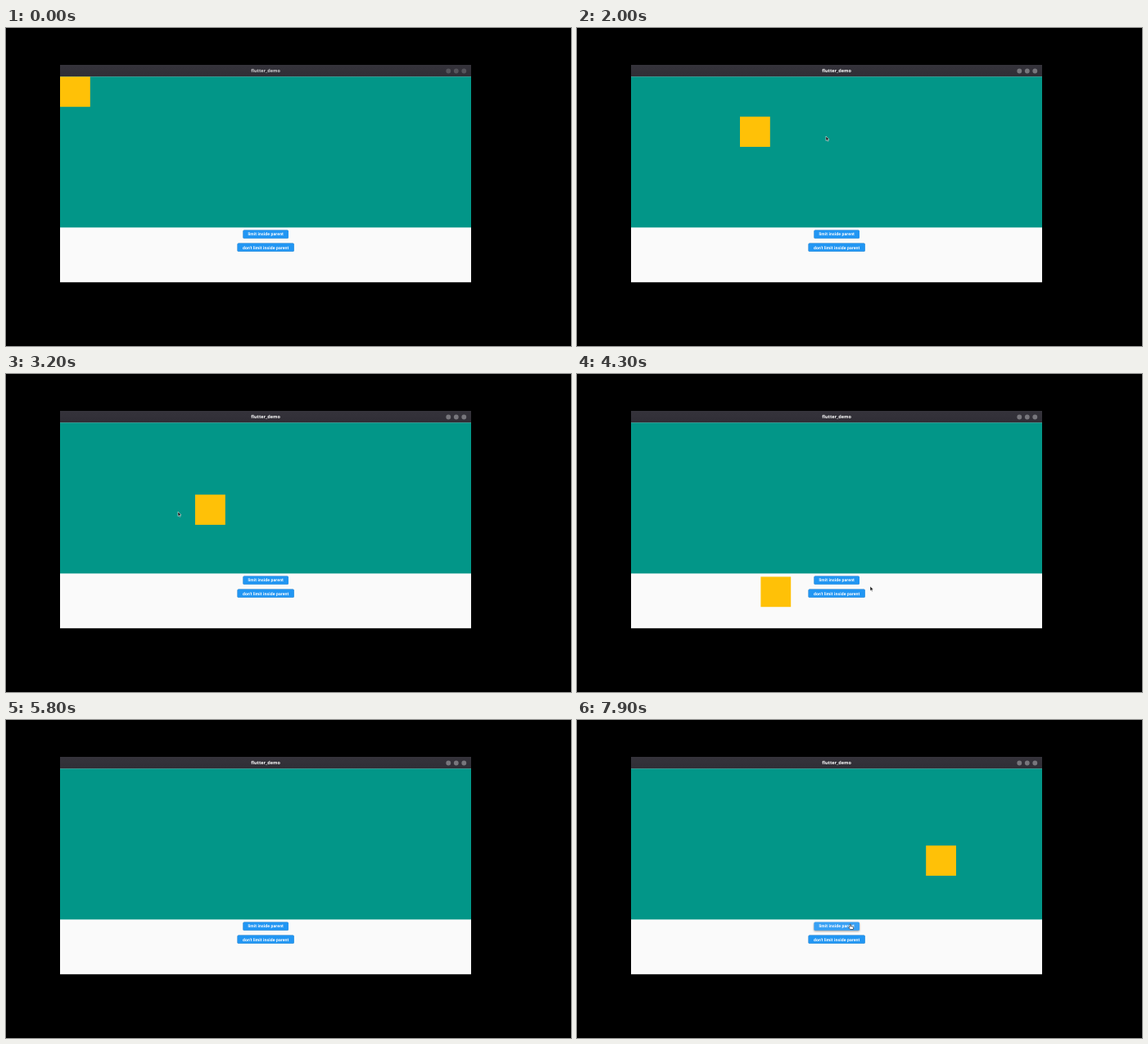
Animation of 690x388 px, one loop 8000 ms. Source, as an HTML page:

```html
<!DOCTYPE html>
<html lang="en">
<head>
<meta charset="utf-8">
<title>flutter_demo</title>
<style>
  html, body { margin: 0; width: 100%; height: 100%; overflow: hidden; background: #000; }
  svg { display: block; width: 690px; height: 388px; }
  text { text-anchor: middle; text-rendering: geometricPrecision; }
  .title { font: bold 5.5px "Open Sans", sans-serif; fill: #fff; }
  .dot { fill: #77767c; }
  .idle .title { fill: #d2d1d4; }
  .idle .dot { fill: #55545b; }
  .button rect { fill: #2196f3; filter: drop-shadow(0 .4px .6px rgba(0, 0, 0, .35)); }
  .button text { font: 700 5.15px Roboto, sans-serif; letter-spacing: .1px; fill: #fff; }
  .hover rect { fill: #37a0f4; filter: drop-shadow(0 1px 1px rgba(0, 0, 0, .38)); }
</style>
</head>
<body>
<svg viewBox="0 0 690 388">
  <defs>
    <clipPath id="frame"><rect x="66" y="45" width="502" height="265.2"/></clipPath>
    <linearGradient id="bar" x2="0" y2="1">
      <stop stop-color="#35333b"/><stop offset="1" stop-color="#302e36"/>
    </linearGradient>
  </defs>
  <rect width="690" height="388"/>
  <g id="window" clip-path="url(#frame)">
    <rect x="66" y="45" width="502" height="266" fill="#fafafa"/>
    <rect x="66" y="45" width="502" height="14.5" fill="url(#bar)"/>
    <text class="title" x="317" y="54.4">flutter_demo</text>
    <circle class="dot" cx="540.3" cy="52.5" r="2.9"/>
    <circle class="dot" cx="549.8" cy="52.5" r="2.9"/>
    <circle class="dot" cx="559.3" cy="52.5" r="2.9"/>
    <rect x="66" y="59.4" width="502" height="184" fill="#029688"/>
    <rect id="box" width="36.8" height="36.8" fill="#ffc107"/>
    <g class="button" id="limit">
      <rect x="289.4" y="246.4" width="55.6" height="10.3" rx="1.5"/>
      <text x="317.2" y="253.4">limit inside parent</text>
    </g>
    <g class="button">
      <rect x="282.5" y="262.5" width="69.3" height="10.3" rx="1.5"/>
      <text x="317.2" y="269.5">don't limit inside parent</text>
    </g>
    <g id="cursor" stroke-linejoin="round">
      <path id="arrow" d="M0 0V5.6L1.3 4.4 2.2 6.3 3.1 5.9 2.3 4.1H4Z" fill="#151515" stroke="#fff" stroke-width=".5"/>
      <path id="hand" d="M-.4 0Q.3-.6.9 0V2.2L3.6 2.8Q4.3 3 4.2 3.8L3.7 6H.3L-1.9 3.6Q-1.8 2.8-.4 3.5Z" fill="#fff" stroke="#151515" stroke-width=".6"/>
    </g>
  </g>
</svg>
<script>
const STEP = 100, LOOP = 80;
const GRAB = [23, 11];       // pointer position inside the dragged box
const ENTER = 5, FOCUS = 14, RELEASE = 66, HOVER = 78, HAND = 79;

// Turning points of the drag: [step, x, y]
const drag = [
  [14, 66, 59.4], [20, 199, 108.2], [21, 281, 121], [23, 372, 131],
  [27, 224, 192], [30, 290, 172], [32, 231, 147.2], [33, 187, 157],
  [38, 262, 195], [41, 177, 205], [43, 224.4, 247.4], [44, 335, 248],
  [46, 378, 215], [49, 328, 174.8], [50, 236, 183], [54, 113, 180],
  [58, 0, 180], [61, 10, 215], [66, 384, 136], [67, 384, 136], [69, 426.2, 153.2]
];

const clamp = u => Math.min(1, Math.max(0, u));
const smooth = u => u * u * (3 - 2 * u);
const mix = (a, b, u) => a + (b - a) * u;

// Smooth curve through the turning points, at rest on both ends.
function boxAt(t) {
  const last = drag.length - 1;
  const next = drag.findIndex(p => p[0] > t);
  if (next === 0) return drag[0].slice(1);
  if (next < 0) return drag[last].slice(1);
  const i = next - 1, a = drag[i], b = drag[next];
  const span = b[0] - a[0], u = (t - a[0]) / span;
  const slope = (k, axis) => {
    if (k === 0 || k === last) return 0;
    const p = drag[k - 1], q = drag[k + 1];
    return (q[axis] - p[axis]) / (q[0] - p[0]);
  };
  return [1, 2].map(axis => mix(a[axis], b[axis], smooth(u))
    + span * u * (1 - u) * (slope(i, axis) * (1 - u) - slope(next, axis) * u));
}

const held = t => boxAt(t).map((v, axis) => v + GRAB[axis]);

// Before the drag the pointer rises in an arc, during it the box trails
// the pointer by one step, afterwards the pointer glides to the button.
function pointerAt(t) {
  if (t < FOCUS) {
    const u = clamp((t - ENTER) / 7), [x, y] = held(0);
    return [mix(117, x, u) - 36 * Math.sin(Math.PI * u), mix(269, y, Math.sin(u * Math.PI / 2))];
  }
  if (t < RELEASE) return held(t + 1);
  const u = smooth(clamp((t - 72) / 7)), [x, y] = held(LOOP);
  return [mix(x, 333.5, u), mix(y, 249.5, u)];
}

const el = id => document.getElementById(id);
const move = (id, [x, y]) => el(id).setAttribute("transform", `translate(${x.toFixed(2)} ${y.toFixed(2)})`);
const show = (id, on) => el(id).setAttribute("visibility", on ? "visible" : "hidden");

function draw(t) {
  move("box", boxAt(t));
  move("cursor", pointerAt(t));
  show("arrow", t >= ENTER && t < HAND);
  show("hand", t >= HAND);
  el("window").classList.toggle("idle", t < FOCUS);
  el("limit").classList.toggle("hover", t >= HOVER);
}

const start = performance.now();
function tick() {
  draw(Math.floor((performance.now() - start) / STEP + .01) % LOOP);
  requestAnimationFrame(tick);
}
tick();
</script>
</body>
</html>
```
